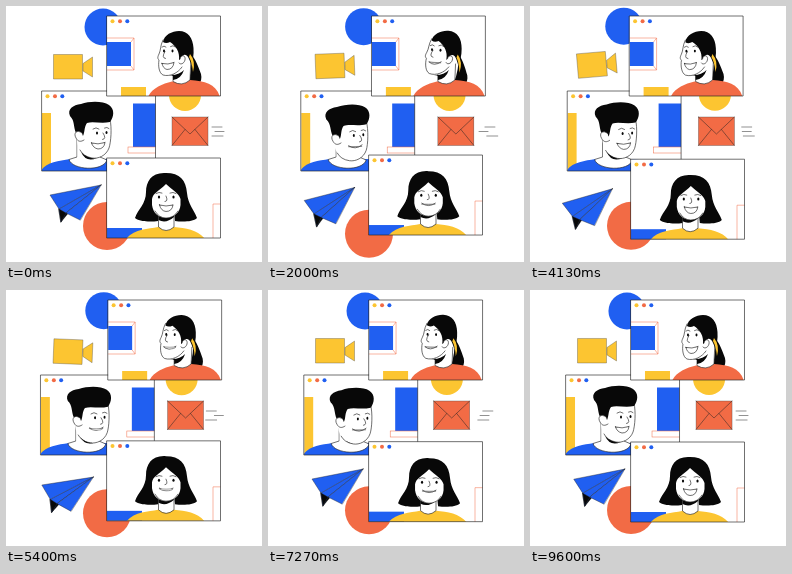
Recreate the animation shown at these times as an HTML page. Size 256 by 256 pixels, loop 9660 ms.

```html
<!DOCTYPE html>
<html lang="en">
<head>
<meta charset="utf-8">
<title>Video call</title>
<style>
  html, body { margin: 0; width: 100%; height: 100%; overflow: hidden; background: #fff; }
  svg { display: block; width: 100%; height: 100%; }
  .blue { fill: #205ff1; }
  .orange { fill: #f26b45; }
  .yellow { fill: #fcc531; }
  .black { fill: #080808; }
  .white { fill: #fff; }
  .ink { stroke: #222; stroke-width: .65; stroke-linejoin: round; stroke-linecap: round; }
  .line { fill: none; }
  .thin { stroke: #444; stroke-width: .35; }
  .trim { fill: none; stroke: #f26b45; stroke-width: .5; }
</style>
</head>
<body>
<svg viewBox="0 0 256 256">
  <defs>
    <rect id="pane" width="113.5" height="80"/>
    <g id="frame">
      <rect class="ink line" width="113.5" height="80"/>
      <circle class="yellow" cx="5.5" cy="5.2" r="2"/>
      <circle class="orange" cx="13" cy="5.2" r="2"/>
      <circle class="blue" cx="20.3" cy="5.2" r="2"/>
    </g>
    <clipPath id="clipA"><use href="#pane" x="101" y="10"/></clipPath>
    <clipPath id="clipB"><use href="#pane" x="36" y="85"/></clipPath>
    <clipPath id="clipC"><use href="#pane" x="101" y="152"/></clipPath>
  </defs>

  <circle class="blue disc" cx="97" cy="21" r="18.5"/>
  <circle class="yellow sun" cx="179" cy="89" r="16"/>
  <circle class="orange ball" cx="101" cy="220" r="24"/>

  <g class="camera">
    <path class="yellow thin" d="M47.5 48.5H76.5V73H47.5Z"/>
    <path class="yellow thin" d="M77 57.5L86.5 51V71L77 65Z"/>
  </g>

  <g class="mail">
    <rect class="orange thin" x="166" y="111" width="36" height="28.5"/>
    <path class="ink line" style="stroke-width:.5" d="M166 111L184 128L202 111M166 139.5L179 123.5M202 139.5L189 123.5"/>
  </g>
  <g class="ink line" style="stroke-width:.5">
    <path class="dash1" d="M206 121h10"/>
    <path class="dash2" d="M209 125.5h9"/>
    <path class="dash3" d="M206 130h11"/>
  </g>

  <g class="plane ink" style="stroke-width:.4">
    <path class="black" d="M53 203L62 207.5L55 216Z"/>
    <path class="blue" d="M95 179L44 189L53 203Z"/>
    <path class="blue" d="M95 179L53 203L55 216L60 207Z"/>
    <path class="black" d="M53 203L60 207L55 216Z"/>
    <path class="blue" d="M95 179L60 207L74 214Z"/>
  </g>

  <g class="winB">
    <use class="white" href="#pane" x="36" y="85"/>
    <g clip-path="url(#clipB)">
      <rect class="yellow" x="36" y="107" width="9" height="58"/>
      <rect class="blue" x="127" y="97.5" width="23" height="43.5"/>
      <rect class="trim" x="122" y="141" width="30" height="6"/>
      <path class="blue" d="M34 166C40 156 52 155 64 153H102C112 154 120 158 124 166Z"/>
      <path class="white ink" d="M71 134V151L63 153.5C66 164 97 166 101 154L94 151V140Z"/>
      <path class="white" d="M71.4 134H93.600V155H71.400Z"/>
      <path class="black" d="M75 146Q82 153 91 152Q80 157 75 146Z"/>
      <g class="headB">
        <path class="white" d="M72 112H104C106 122 105 136 103 142C100 150 92 153 86 152C78 150 72 144 71 135Z"/>
        <path class="ink line" d="M104 113C106 122 105 136 103 142C100 150 92 153 86 152C80 151 76 148 74 144"/>
        <path class="black" d="M70 127C67 120 69 115 64 110C61 103 67 99 75 98C84 95 97 95 103 99C109 103 108 111 104 116C95 118 87 115 81 117C78 121 79 126 77 130Z"/>
        <path class="white ink" d="M76 127C71 123 67 127 70 132C72 136 75 136 78 134"/>
        <path class="ink line" d="M87 123Q90 120.500 93 123M98.500 122Q101 120.500 103 122.500M97 127Q101 133 96.500 133.500M85.500 137Q92 142 99 136.500"/>
        <ellipse class="black" cx="91" cy="127" rx="1" ry="1.500"/>
        <ellipse class="black" cx="100.500" cy="126.500" rx="1" ry="1.500"/>
        <path class="mouthB white ink" d="M85.500 137Q92 139 99 136.500Q98 143 92 143Q87 142 85.500 137Z"/>
      </g>
    </g>
    <use href="#frame" x="36" y="85"/>
  </g>

  <g class="winA">
    <use class="white" href="#pane" x="101" y="10"/>
    <g clip-path="url(#clipA)">
      <path class="trim" d="M100 32H128V64H100M128 32L125 36M128 64L125 60"/>
      <rect class="blue" x="101" y="36" width="24" height="24"/>
      <rect class="yellow" x="115" y="81" width="25" height="10"/>
      <path class="headA black" d="M185 48C190 54 192 60 195 68C196 72 195 76 193 78L182 77C185 68 186 58 185 48Z"/>
      <path class="orange" d="M142 91C146 82 156 78 166 75.500L184 74C199 75 210 78 214 91Z"/>
      <path class="white ink" d="M167 62V75.500Q176 81 184 74L185 50L173 52Z"/>
      <path class="black" d="M163 69Q172 70 178 64Q175 73 167 74V70Z"/>
      <g class="headA">
        <path class="white" d="M156 32C153 40 154 45 151 52C152 58 152 66 157 69C164 71 173 67 177 60L185 56V34Z"/>
        <path class="ink line" d="M157 34C154 40 155 44 153 48C151 52 152 53 153 54C152 60 153 67 157 69C164 71 172 67 176 61"/>
        <path class="black" d="M157 36C158 29 166 25 173 25C182 25 187 32 187.500 42C188 49 187 54 185 58C183 52 181 48 178 49C175 50 175 54 173 54C174 46 170 40 164 36Q160 38 157 36Z"/>
        <path class="white ink" d="M174 53C175 48 180 49 179 54C178 58 174 59 173 57"/>
        <path class="yellow" d="M184 48Q190 55 187 66Q186 56 183 51Z"/>
        <path class="ink line" d="M156 41Q158 39 160 41M164.500 40.500Q167 38.500 169.500 41M159 45.500Q155 52 159.500 52.500M156 57.500Q161 62 168 56.500"/>
        <ellipse class="black" cx="158" cy="45" rx="1" ry="1.400"/>
        <ellipse class="black" cx="166.500" cy="45" rx="1" ry="1.400"/>
        <path class="mouthA white ink" d="M156 57.500Q162 59 168 56.500Q167 63.500 161 63.500Q157 62.500 156 57.500Z"/>
      </g>
    </g>
    <use href="#frame" x="101" y="10"/>
  </g>

  <g class="winC">
    <use class="white" href="#pane" x="101" y="152"/>
    <g clip-path="url(#clipC)">
      <rect class="blue" x="101" y="222" width="35" height="11"/>
      <path class="trim" d="M207 234V198H216"/>
      <path class="headC black" d="M160 167C146 166 140 175 140 186C140 198 132 203 129 212C134 216 145 216 152 215L153 205H168L169 215C176 216 187 216 191 212C188 204 182 198 181 187C180 174 174 167 160 167Z"/>
      <path class="yellow" d="M120 233C128 223 142 223 152 221H168C180 222 192 224 199 233Z"/>
      <path class="white ink" d="M152.500 205V221Q160 228 168 221V205Z"/>
      <path class="black" d="M152.500 209Q160 215 168 209V211Q160 218 152.500 214Z"/>
      <g class="headC">
        <path class="white" d="M160 178C153 185 147 187 146 193V199C147 207 153 212 160 212C167 212 174 207 174.500 199V193C173 187 166 184 160 178Z"/>
        <path class="ink line" d="M149 205Q153 212 160 212Q168 212 172 205M150 187.500Q153 185.500 156 187M164 187Q167 185.500 170 187.500M160 190Q162.500 195.500 159 195.500M153.500 199Q160 204 167 199"/>
        <ellipse class="black" cx="153" cy="191" rx="1.100" ry="1.500"/>
        <ellipse class="black" cx="167.500" cy="191" rx="1.100" ry="1.500"/>
        <path class="mouthC white ink" d="M153.500 199Q160 201 167 199Q166 205.500 160 205.500Q155 205 153.500 199Z"/>
      </g>
    </g>
    <use href="#frame" x="101" y="152"/>
  </g>
</svg>
<script>
  const SLOW = 4830, FAST = SLOW / 2;
  const tracks = [];

  // Each pose is [x, y, degrees, height scale]; every motion returns to rest.
  function move(name, period, poses, { at, pivot = [0, 0] } = {}) {
    const steps = [[], ...poses, []].map(([x = 0, y = 0, turn = 0, tall = 1]) => [x, y, turn, tall]);
    const stops = at ? [0, ...at, 1] : steps.map((_, i) => i / (steps.length - 1));
    tracks.push({ parts: document.querySelectorAll('.' + name), period, steps, stops, pivot });
  }

  function draw(now) {
    for (const { parts, period, steps, stops, pivot: [px, py] } of tracks) {
      const phase = now % period / period;
      const i = stops.findIndex(stop => stop > phase);
      const u = (phase - stops[i - 1]) / (stops[i] - stops[i - 1]);
      const ease = u * u * (3 - 2 * u);
      const [x, y, turn, tall] = steps[i].map((to, k) => steps[i - 1][k] + (to - steps[i - 1][k]) * ease);
      const transform = `translate(${x + px} ${y + py}) rotate(${turn}) scale(1 ${tall}) translate(${-px} ${-py})`;
      for (const part of parts) part.setAttribute('transform', transform);
    }
    requestAnimationFrame(draw);
  }

  move('winA', SLOW, [[4], [-3.5]]);
  move('winB', SLOW, [[-4], [4]]);
  move('winC', SLOW, [[0, -4], [0, 3]]);
  move('ball', SLOW, [[0, 11], [0, -6], []], { at: [.33, .63, .88] });

  move('headA', SLOW, [[1, 0, 5], [0, 0, -1]], { pivot: [178, 76] });
  move('headB', SLOW, [[-2, 3, -2], [0, 1]], { pivot: [87, 150] });
  move('headC', SLOW, [[0, 1], [2, 2]]);

  const shut = [0, 0, 0, .05];
  const smile = (name, pivot) => move(name, SLOW, [shut, shut, []], { at: [.18, .6, .84], pivot });
  smile('mouthA', [161, 57.5]);
  smile('mouthB', [92, 138]);
  smile('mouthC', [160, 200]);

  const at = [.15, .45];
  move('disc', FAST, [[2.5], [-6, -1.5]], { at });
  move('sun', FAST, [[-7, .5], [11, -.5]], { at });
  move('camera', FAST, [[0, 0, 5], [0, 0, -9]], { at, pivot: [40, 61] });
  move('plane', FAST, [[-11, 9, 3], [-12, 10, 5], [-11, 6, -5]], { at: [.34, .47, .72], pivot: [69, 198] });

  const slide = (name, ...xs) => move(name, SLOW, xs.map(x => [x]));
  slide('mail', -7, 4, -4, 3);
  slide('dash1', -9, 11, 7, 7);
  slide('dash2', -1, 2, 4, 4);
  slide('dash3', -10, 13, -4, 9);

  draw(performance.now());
</script>
</body>
</html>
```
